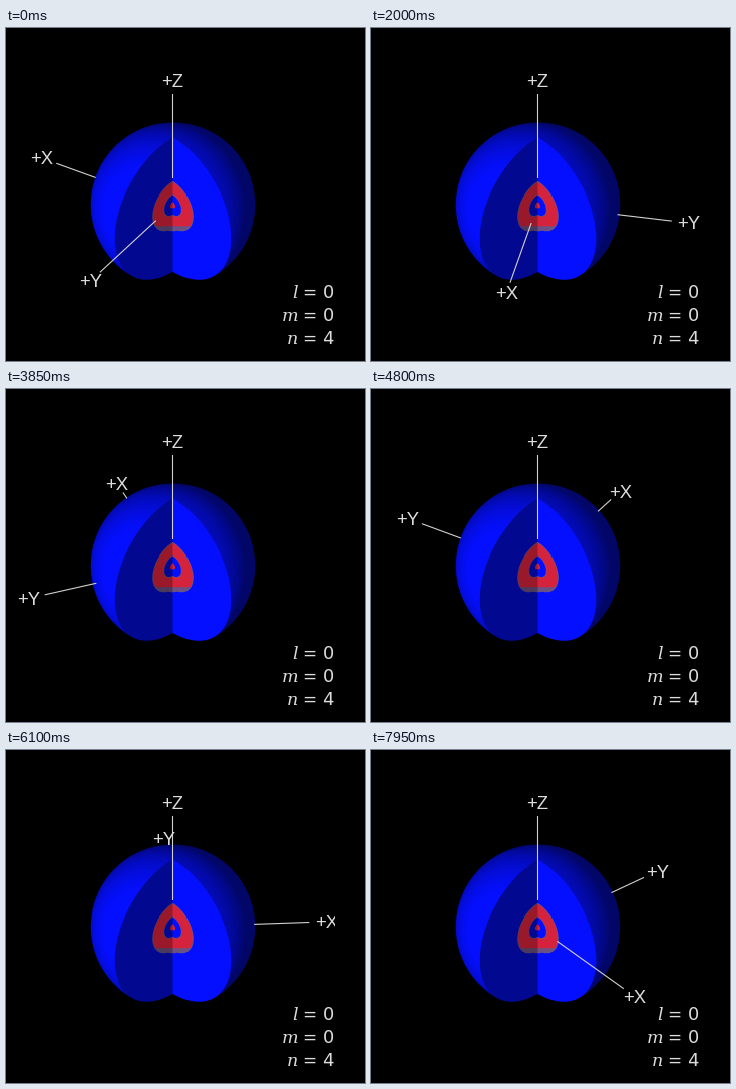
A matplotlib script that plays this animation: 359x333 px, repeating every 8 s.

```python
import numpy as np
import matplotlib.pyplot as plt
from matplotlib.animation import FuncAnimation
from matplotlib.patches import Rectangle

W, H, DPI = 359, 333, 100
FRAMES, STEP = 160, 50
CX, CY = 166.5, 177.2            # projected centre of the orbital
BALL, AXIS = 81.7, 154           # radius of the ball, distance of the labels
SIN, COS = np.sqrt(1 / 3), np.sqrt(2 / 3)   # isometric camera tilt
LINE_START, LINE_END = 0.205, 0.89
RIGHT_EDGE = 329
INK = "#dcdcdc"

# Heading of the X axis in degrees: a fast spin that slowly dies out
KEY_T = np.array([0, 0.85, 1.2, 2, 3, 4, 4.8, 6.1, 7, 7.95])
KEY_A = -122 - np.array([0, 116.5, 164, 249.6, 338.4, 406, 450.5, 504.6, 534.2, 559])
KEY_V = np.gradient(KEY_A, KEY_T)


def heading(t):
    i = min(np.searchsorted(KEY_T, t, side="right") - 1, len(KEY_T) - 2)
    span = KEY_T[i + 1] - KEY_T[i]
    u = (t - KEY_T[i]) / span
    ease = u * u * (3 - 2 * u)
    return (KEY_A[i] * (1 - ease) + KEY_A[i + 1] * ease
            + span * u * (1 - u) * (KEY_V[i] * (1 - u) - KEY_V[i + 1] * u))


def shade(nx, ny, nz):
    light = -0.45 * nx - 0.1 * ny + 0.88 * nz
    return np.clip(0.4 + 0.7 * np.clip(light, 0, None), 0, 1)


def render_ball(ss=4):
    """Shaded ball with a quarter cut out, showing the nested shells."""
    px = (np.arange(W * ss) + 0.5) / ss - CX
    py = (np.arange(H * ss) + 0.5) / ss - CY
    x, y = np.meshgrid(px, py)
    img = np.zeros(x.shape + (3,))
    blue = np.array([0.02, 0.06, 1.0])
    red = np.array([0.84, 0.14, 0.24])
    rim = np.array([0.42, 0.32, 0.52])

    z = np.sqrt(np.clip(BALL**2 - x**2 - y**2, 0, None))
    in_wedge = SIN * y + COS * z > np.abs(x)
    skin = (x**2 + y**2 < BALL**2) & ~in_wedge
    lit = shade(x / BALL, -y / BALL, z / BALL)
    img[skin] = lit[skin][:, None] * blue

    # Both cut faces mirror each other: a runs outward, b along the Z axis
    h = np.sqrt(0.5)
    a = np.abs(x) / h
    b = (a * h * SIN - y) / COS
    r = np.hypot(a, b)
    face_lit = np.where(x > 0, shade(-h, -h * SIN, h * COS), shade(h, -h * SIN, h * COS))
    core_lit = 0.35 + 0.65 * face_lit
    bowl = np.hypot(x / 20, (y - 9) / 17) < 1    # rounded underside of the core
    for part, colour, light in ((r < BALL, blue, face_lit),
                                ((r < 28.6) | bowl, rim, core_lit),
                                ((r < 27.4) & (y < 21), red, core_lit),
                                (r < 12.6, rim, core_lit),
                                (r < 11.8, blue, face_lit),
                                (r < 3.5, red, core_lit)):
        img[part] = light[part][:, None] * colour
    return img.reshape(H, ss, W, ss, 3).mean(axis=(1, 3))


fig = plt.figure(figsize=((W + 1e-6) / DPI, (H + 1e-6) / DPI), dpi=DPI, facecolor="black")
ax = fig.add_axes([0, 0, 1, 1])
ax.imshow(render_ball(), extent=(0, W, H, 0), interpolation="nearest", aspect="auto")
ax.set(xlim=(0, W), ylim=(H, 0))
ax.axis("off")
window = Rectangle((0, 0), RIGHT_EDGE, H, transform=ax.transData)


def text(x, y, s, px, font="Liberation Sans", **kw):
    kw.setdefault("ha", "center")
    label = ax.text(x, y, s, fontsize=px * 72 / DPI, family=font, color=INK,
                    va="baseline", clip_on=True, **kw)
    label.set_clip_path(window)
    return label


def line(xs, ys):
    return ax.plot(xs, ys, color="#d0d0d0", lw=0.8, solid_capstyle="butt", snap=False)[0]


for base, name, value in ((270, "l", "0"), (293, "m", "0"), (316, "n", "4")):
    text(292, base, name, 17.5, "DejaVu Serif", style="italic", ha="right")
    text(303.3, base, "=", 17, "DejaVu Sans")
    text(322.2, base, value, 18, "DejaVu Sans")

line([CX, CX], [66, 150])
text(CX, 59, "+Z", 18.5)
spokes = [(offset, line([], []), text(0, 0, name, 18.5))
          for name, offset in (("+X", 0), ("+Y", 90))]


def draw(i):
    base = heading(i * STEP / 1000)
    changed = []
    for offset, spoke, label in spokes:
        ang = np.radians(base + offset)
        dx, dy = AXIS * np.sin(ang), AXIS * SIN * np.cos(ang)
        if np.cos(ang) > np.sqrt(0.5):       # inside the open quarter
            start = LINE_START
        elif np.cos(ang) > 0:                # leaves through the front skin
            start = BALL / AXIS
        else:                                # emerges from behind the outline
            start = BALL / np.hypot(dx, dy)
        ends = np.array([min(start, LINE_END), LINE_END])
        spoke.set_data(CX + dx * ends, CY + dy * ends)
        label.set_position((CX + dx, CY + dy + 6.3))
        changed += [spoke, label]
    return changed


anim = FuncAnimation(fig, draw, frames=FRAMES, interval=STEP, repeat=True,
                     repeat_delay=0, blit=False)
plt.show()
```
